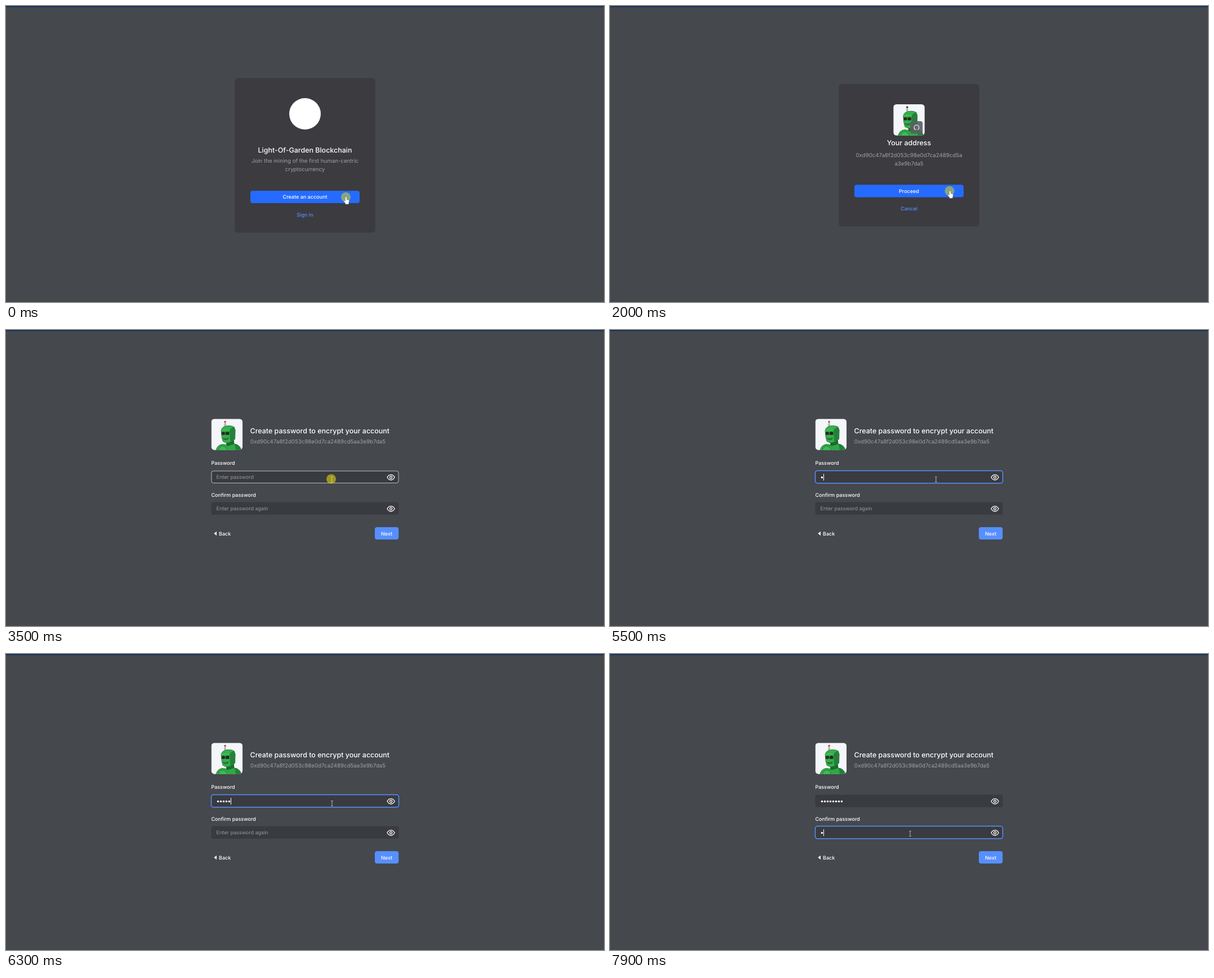
An HTML page for the animation above (8000 ms loop, 1062 px wide and 527 px high).

```html
<!DOCTYPE html>
<html lang="en">
<head>
<meta charset="utf-8">
<title>Account sign-up</title>
<style>
  html, body { margin: 0; width: 100%; height: 100%; overflow: hidden; background: #45484c; }
  svg { display: block; width: 1062px; height: 527px; }
  text { font-family: Inter, sans-serif; font-size: 9.02px; fill: #fff; text-rendering: geometricPrecision; }
  .mid { text-anchor: middle; }
  .bold { font-weight: 500; }
  .title { font-size: 12.48px; font-weight: 500; }
  .body { font-size: 9.71px; fill: #a0a1a4; }
  .hint { fill: #97999d; }
  .link { fill: #578fff; font-weight: 500; }
  .card { fill: #3b3b40; }
</style>
</head>
<body>
<svg viewBox="0 0 1062 527" xmlns="http://www.w3.org/2000/svg">
  <defs>
    <clipPath id="round"><rect width="55.5" height="55.5" rx="5.5"/></clipPath>

    <g id="green" clip-path="url(#round)">
      <rect width="56" height="56" fill="#f4f6f9"/>
      <path d="M24.5 6V16" stroke="#8d9196" stroke-width="1.2"/>
      <circle cx="24.5" cy="10" r="1.5" fill="#d3d5d8" stroke="#73777b" stroke-width=".6"/>
      <path d="M22.600 16.500L23.500 13H25.700L26.800 16Z" fill="#9a9da1"/>
      <circle class="bulb" cx="24.5" cy="5.2" r="1.7"/>
      <path d="M29 36L40 35 41 47 31 51 26 46Z" fill="#1d6a30"/>
      <path d="M8.500 56Q10 47.500 18 45.500Q24 44.500 29 48L40 44.500Q51 45.500 53.500 56Z" fill="#2fa945" stroke="#1c5d2a" stroke-width=".7"/>
      <path d="M40 44.500Q51 45.500 53.500 56H43Q43.500 49 40 44.500Z" fill="#22803a"/>
      <path d="M13 56Q14 49 20.500 48.500Q27 50 28 56" fill="#3dbb53" stroke="#1c5d2a" stroke-width=".6"/>
      <path d="M17.500 21Q19 13.500 27 12.500Q36 11.500 40.500 14.500L42.500 20 42 36 34 41.500 27 43 20.500 40 18.500 32Z" fill="#35b04b" stroke="#1c6a2e" stroke-width=".8"/>
      <path d="M32.500 20Q36 15 40.500 14.500L42.500 20 42 36 34 41.500 33 34Z" fill="#24813a"/>
      <path d="M18 21Q25 18 32.500 20" fill="none" stroke="#58cf6a" stroke-width=".9"/>
      <path d="M17.800 23.500L32 23V28.800L18.200 28.600Z" fill="#236f34"/>
      <circle cx="21.200" cy="25.800" r="2.700" fill="#2a211f"/>
      <circle cx="28.700" cy="25.800" r="2.900" fill="#2a211f"/>
      <circle cx="21.200" cy="25.800" r=".8" fill="#6c2f2b"/>
      <circle cx="28.700" cy="25.800" r=".8" fill="#6c2f2b"/>
      <path d="M20.500 33.600Q25 35.600 31 33.300L30 36.600Q25 38.500 21.200 36.600Z" fill="#1b4f28"/>
      <path d="M21.200 35.200Q25.500 36.900 30 35" fill="none" stroke="#79c887" stroke-width=".6"/>
    </g>

    <g id="brown" clip-path="url(#round)">
      <rect width="56" height="56" fill="#f4f6f9"/>
      <path d="M19 56Q19 51 24 49.500L36 48Q43 50 44 56Z" fill="#70452c" stroke="#3d2619" stroke-width=".7"/>
      <path d="M24 45H36L37 50Q31 53 25 50Z" fill="#57351f"/>
      <circle cx="22.500" cy="53" r="3" fill="#8d5a38" stroke="#3d2619" stroke-width=".6"/>
      <path d="M13 35Q13 26 20 20.500L30 18.500Q40 22 42.500 34L39 42Q34 47 25 45.500Q14 42 13 35Z" fill="#8a542f" stroke="#4b2c1b" stroke-width=".8"/>
      <path d="M30 18.500Q40 22 42.500 34L39 42Q36 45 32 45.600Q39 32 30 18.500Z" fill="#693d24"/>
      <path d="M14.500 29Q26 22 38 27M17 24.500Q26 19.500 35 22.500" fill="none" stroke="#5b341f" stroke-width="1"/>
      <path d="M20.500 20.500L21 16Q24.500 13.500 28 16L29 20Q25 22 20.500 20.500Z" fill="#5d2f23" stroke="#402018" stroke-width=".6"/>
      <ellipse cx="25.300" cy="35" rx="3" ry="3.300" fill="#3d241a" stroke="#b27a4d" stroke-width=".7"/>
      <path d="M15 38Q19 42 26 42.500" fill="none" stroke="#54301d" stroke-width="1"/>
    </g>

    <g id="reload">
      <rect x="30" y="30" width="22" height="22.200" rx="4" fill="#5a5d63" fill-opacity=".9"/>
      <path d="M37.700 44.300A4.500 4.500 0 1 1 43 45.500M37.500 41.200V44.600H40.800" fill="none" stroke="#e3e4e6" stroke-width="1.100"/>
    </g>

    <g id="eye" fill="none" stroke="#fff" stroke-width="1.300">
      <path d="M-6.600 0Q-4-4.700 0-4.700T6.600 0Q4 4.700 0 4.700T-6.600 0Z"/>
      <circle r="2.100"/>
    </g>

    <path id="hand" d="M-1.300 1.300A1.300 1.300 0 0 1 1.300 1.300V4.700L4.500 5.500Q5.700 5.900 5.500 7.200L4.700 11V13H-1.200V11.200L-4 7.700Q-4.500 6.300-3.100 6.300L-1.300 7.800Z" fill="#fff" stroke="#333" stroke-opacity=".6" stroke-width=".4"/>
    <path id="beam" d="M-2-4.500H-.6L0-4 .6-4.500H2M0-4V4M-2 4.500H-.6L0 4 .6 4.500H2" fill="none" stroke="#c3c5c7" stroke-width=".9"/>
  </defs>

  <rect width="1062" height="527" fill="#45484c"/>
  <rect width="1062" height="2" fill="#16325f"/>

  <g id="welcome">
    <rect class="card" x="406.200" y="128.300" width="249.600" height="275" rx="5.500"/>
    <circle cx="531" cy="192" r="28" fill="#fff"/>
    <text class="title mid" x="531" y="261.300">Light-Of-Garden Blockchain</text>
    <text class="body mid" x="531" y="279.200">Join the mining of the first human-centric</text>
    <text class="body mid" x="531" y="293.700">cryptocurrency</text>
    <rect x="434" y="328.900" width="194" height="22.200" rx="4" fill="#256bff"/>
    <text class="bold mid" x="531" y="343.300">Create an account</text>
    <text class="link mid" x="531" y="374.800">Sign In</text>
  </g>

  <g id="address">
    <rect class="card" x="406.200" y="139" width="249.600" height="253.500" rx="5.500"/>
    <g transform="translate(503.250 175)">
      <use id="face1" href="#brown"/>
      <use id="face2" href="#green"/>
      <use href="#reload"/>
    </g>
    <text class="title mid" x="531" y="247.500">Your address</text>
    <text id="line1" class="body mid" x="531" y="269.200"></text>
    <text id="line2" class="body mid" x="531" y="283.700"></text>
    <rect id="proceed" x="434" y="318.300" width="194" height="22.200" rx="4"/>
    <text class="bold mid" x="531" y="332.700">Proceed</text>
    <text class="link mid" x="531" y="364.300">Cancel</text>
  </g>

  <g id="password">
    <use href="#green" x="364.600" y="158.200"/>
    <text class="title" x="433.600" y="183.900">Create password to encrypt your account</text>
    <text id="full" class="body" x="433.800" y="201.500"></text>
    <text class="bold" x="364.400" y="240.400">Password</text>
    <text class="bold" x="364.500" y="296.900">Confirm password</text>
    <g id="fields"></g>
    <path d="M374 358.700V366L369.300 362.350Z" fill="#fff"/>
    <text class="bold" x="378" y="365.600">Back</text>
    <rect x="655" y="350.900" width="42.300" height="22.200" rx="4" fill="#578fff"/>
    <text class="bold mid" x="676.100" y="365.600">Next</text>
  </g>

  <circle id="press" r="8.500" fill="#ebde00"/>
  <use id="pointer"/>
</svg>
<script>
const LOOP = 8000;
const BLUE = '#578fff', DEEP = '#256bff';
const first = ['0x8d4f05b4a6cf84a9d54fb38a4d6f758a', '5edf4fed'];
const second = ['0xd90c47a8f2d053c98e0d7ca2489cd5a', 'a3e9b7da5'];

const $ = id => document.getElementById(id);
const show = (el, on) => el.setAttribute('display', on ? 'inline' : 'none');
const set = (el, attrs) => { for (const k in attrs) el.setAttribute(k, attrs[k]); };

function add(parent, tag, attrs) {
  const el = document.createElementNS('http://www.w3.org/2000/svg', tag);
  set(el, attrs);
  return parent.appendChild(el);
}

function makeField(y, label) {
  const g = add($('fields'), 'g', { transform: `translate(364.5 ${y})` });
  add(g, 'rect', { width: 333, height: 22.2, rx: 4, fill: '#3a3b40' });
  const edge = add(g, 'rect', { fill: 'none' });
  const hint = add(g, 'text', { class: 'hint', x: 9.1, y: 14.7 });
  hint.textContent = label;
  const dots = Array.from({ length: 8 }, (_, i) =>
    add(g, 'circle', { cx: 12 + 5 * i, cy: 12, r: 1.75, fill: '#fff' }));
  const caret = add(g, 'rect', { y: 5.5, width: 1, height: 12, fill: '#fff' });
  add(g, 'use', { href: '#eye', x: 319.1, y: 11.7 });

  return (state, count) => {
    const focus = state === 'focus';
    const inset = focus ? 0 : 0.4;
    show(edge, state);
    set(edge, {
      x: inset, y: inset, width: 333 - 2 * inset, height: 22.2 - 2 * inset,
      rx: 4 - inset, stroke: focus ? BLUE : '#e4e5e6', 'stroke-width': focus ? 1.5 : 0.8
    });
    show(hint, !count);
    dots.forEach((d, i) => show(d, i < count));
    show(caret, focus && count);
    caret.setAttribute('x', 9.5 + 5 * count);
  };
}

const drawPassword = makeField(250.6, 'Enter password');
const drawConfirm = makeField(306.6, 'Enter password again');
$('full').textContent = second.join('');

// start time, pointer shape, its place, highlight place and strength
const moves = [
  [0, 'hand', 603.9, 340, 603.5, 340.3, 0.5],
  [500, 'hand', 545, 211.5, 544.3, 212.5, 0.57],
  [2000, 'hand', 603.9, 329.3, 603, 329.2, 0.5],
  [3500, 'beam', 578.7, 265.7, 577.5, 265.2, 0.57],
  [4500, 'beam', 578.9, 266],
  [6900, 'beam', 533, 319.7, 532, 319.2, 0.57],
  [7400, 'beam', 533, 319.9]
];

function drawPointer(t) {
  const [, shape, x, y, cx, cy, alpha] = moves.filter(m => m[0] <= t).pop();
  set($('pointer'), { href: '#' + shape, x, y });
  show($('press'), alpha);
  if (alpha) set($('press'), { cx, cy, 'fill-opacity': alpha });
}

function draw(t) {
  show($('welcome'), t < 500);
  show($('address'), t >= 500 && t < 3500);
  show($('password'), t >= 3500);

  const next = t >= 2000;
  const lines = next ? second : first;
  show($('face1'), !next);
  show($('face2'), next);
  $('line1').textContent = lines[0];
  $('line2').textContent = lines[1];
  $('proceed').setAttribute('fill', next ? DEEP : BLUE);
  document.querySelector('.bulb').setAttribute('fill', t < 3500 ? '#333' : '#c8373c');

  const typed = t < 5500 ? 0 : Math.min(8, 1 + Math.floor((t - 5500) / 200));
  drawPassword(t < 4500 ? 'hover' : t < 7400 ? 'focus' : '', typed);
  drawConfirm(t < 6900 ? '' : t < 7400 ? 'hover' : 'focus', t < 7900 ? 0 : 1);
  drawPointer(t);
}

const start = performance.now();
function tick() {
  draw((performance.now() - start) % LOOP);
  requestAnimationFrame(tick);
}
tick();
</script>
</body>
</html>
```
